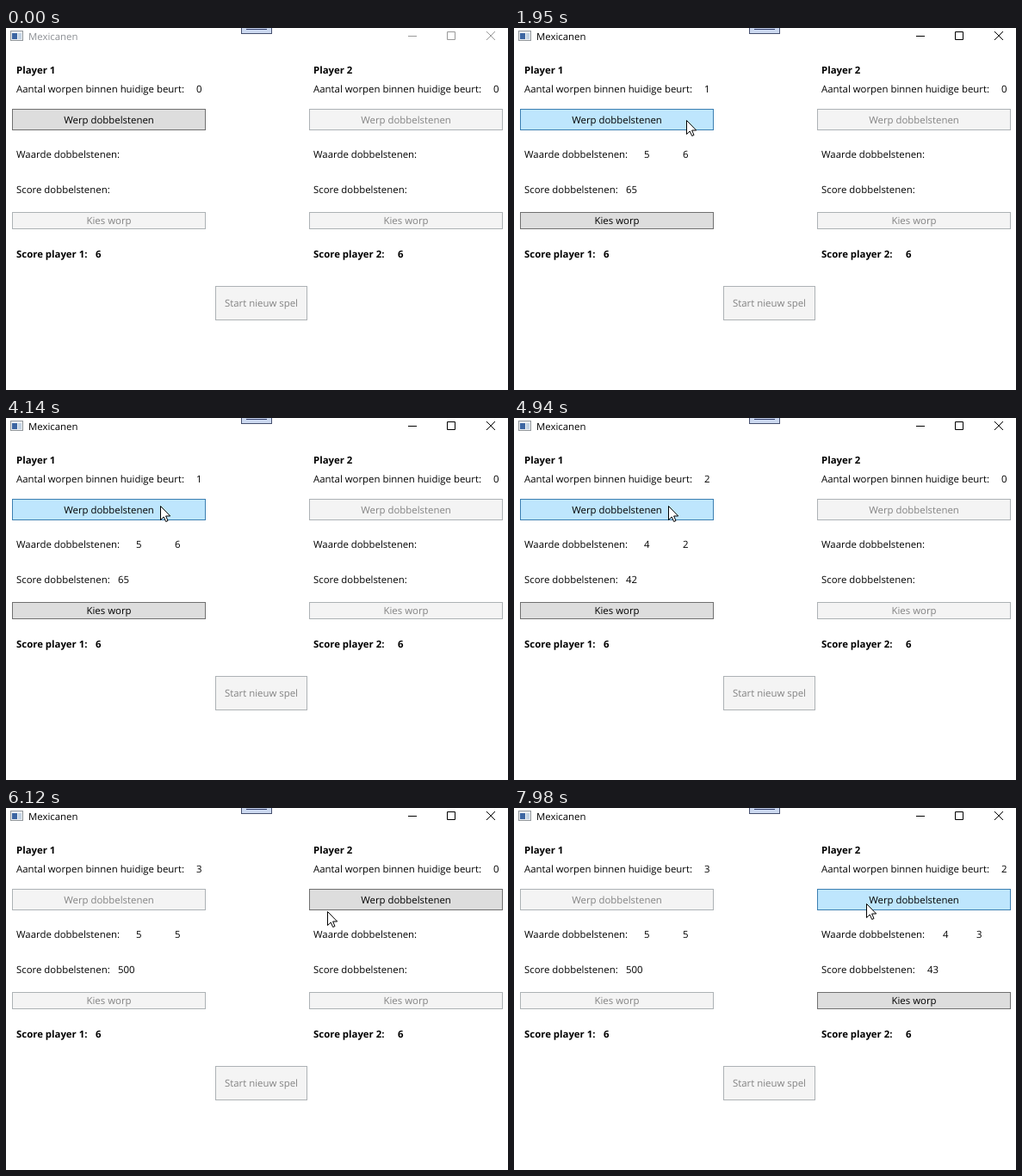
Write an HTML page that moves like this. It is 583x421 px and loops after 8000 ms.

```html
<!DOCTYPE html>
<html lang="nl">
<head>
<meta charset="utf-8">
<title>Mexicanen</title>
<style>
html, body { margin: 0; width: 100%; height: 100%; overflow: hidden; background: #fff; }
svg { display: block; width: 583px; height: 421px; }
text { font: 11.4px "Open Sans", "Noto Sans", sans-serif; white-space: pre; text-rendering: geometricPrecision; }
.bold { font-weight: 700; }
.mid { text-anchor: middle; }
</style>
</head>
<body>
<svg id="stage" viewBox="0 0 583 421"></svg>
<script>
const LOOP = 8000, TICK = 66;
const stage = document.getElementById('stage');

function add(tag, attrs, content = '') {
  const el = document.createElementNS('http://www.w3.org/2000/svg', tag);
  for (const k in attrs) el.setAttribute(k, attrs[k]);
  el.textContent = content;
  stage.append(el);
  return el;
}
const label = (x, y, s = '', cls = '') => add('text', { x, y, class: cls }, s);

const LOOKS = { // fill, border, text
  normal: ['#dddddd', '#707070', '#000'],
  hover: ['#bee6fd', '#3c7fb1', '#000'],
  pressed: ['#c4e5f6', '#2c628b', '#000'],
  disabled: ['#f4f4f4', '#adb2b5', '#838383']
};

function button(x, y, w, h, caption) {
  const box = add('rect', { x: x + .5, y: y + .5, width: w - 1, height: h - 1 });
  const text = label(x + w / 2, Math.ceil(y + h / 2) + 4, caption, 'mid');
  return {
    holds: p => p.x >= x && p.x < x + w && p.y >= y && p.y < y + h,
    show(look) {
      const [fill, stroke, ink] = LOOKS[look];
      box.setAttribute('fill', fill);
      box.setAttribute('stroke', stroke);
      text.setAttribute('fill', ink);
    }
  };
}

// Title bar
add('rect', { x: 5.5, y: 3.5, width: 14, height: 11, fill: '#eceff2', stroke: '#92979c' });
add('rect', { x: 7, y: 6, width: 6, height: 7, fill: '#3d66a3' });
add('rect', { x: 14, y: 6, width: 4, height: 7, fill: '#c3d3e4' });
const title = label(26, 14, 'Mexicanen');
const controls = add('path', {
  d: 'M467 9.5h10M512.5 4.5h9v9h-9zM558 4l10 10M568 4l-10 10', fill: 'none'
});
add('rect', { x: 273.5, y: -5.5, width: 35, height: 12, fill: '#ccd9f0', stroke: '#46506f' });
add('path', { d: 'M279 1.5h24', stroke: '#34406e' });

function player(n, x, die1, die2, score, total) {
  label(x + 5, 53, 'Player ' + n, 'bold');
  label(x + 5, 75, 'Aantal worpen binnen huidige beurt:');
  label(x + 5, 151, 'Waarde dobbelstenen:');
  label(x + 5, 192, 'Score dobbelstenen:');
  label(x + 5, 267, `Score player ${n}:`, 'bold');
  label(x + total, 267, '6', 'bold');
  return {
    roll: button(x, 94, 225, 25, 'Werp dobbelstenen'),
    pick: button(x, 214, 225, 20, 'Kies worp'),
    fields: [label(x + 214, 75), label(x + die1, 151), label(x + die2, 151), label(x + score, 192)]
  };
}
const players = [player(1, 7, 144, 189, 123, 97), player(2, 352, 146, 185, 128, 103)];
button(243, 300, 107, 40, 'Start nieuw spel').show('disabled');

// Press times and dice; a turn is three throws
const TURN = 3, RELEASE = 140, RESULT = 200;
const throws = [[1750, '56'], [4210, '42'], [5070, '55'], [6720, '61'], [7780, '43']];

// A pair counts in hundreds, otherwise the highest die comes first
const scoreOf = ([a, b]) => a === b ? a * 100 : Math.max(a + b, b + a);

// Pointer moves: curved path with one control point, easing out by a power
const moves = [
  { start: 500, span: 730, power: 2, path: [[486, 407], [260, 37], [200, 107]] },
  { start: 3220, span: 790, power: 1, path: [[200, 107], [155, 242], [179, 102]] },
  { start: 5660, span: 730, power: 2.4, path: [[179, 102], [201, 165], [409, 111]] }
];

function pointerAt(t) {
  const move = moves.filter(m => m.start <= t).pop();
  if (!move) return null;
  const elapsed = Math.floor((t - move.start + 8) / TICK) * TICK;
  const v = (1 - Math.min(1, elapsed / move.span)) ** move.power, u = 1 - v;
  const [x, y] = [0, 1].map(k => {
    const [a, c, b] = move.path.map(p => p[k]);
    return Math.round(v * v * a + 2 * u * v * c + u * u * b);
  });
  return { x, y };
}

const arrow = add('path', {
  d: 'M.5 .5V16.6L4.2 13L6.7 18.5L9 17.5L6.6 12H11.7Z', fill: '#fff', stroke: '#000'
});

function render(t) {
  const pos = pointerAt(t);
  arrow.setAttribute('visibility', pos ? 'visible' : 'hidden');
  if (pos) arrow.setAttribute('transform', `translate(${pos.x} ${pos.y})`);

  const active = t >= throws[0][0];
  title.setAttribute('fill', active ? '#000' : '#8c8f94');
  controls.setAttribute('stroke', active ? '#000' : '#999');

  const done = throws.filter(([at]) => t >= at + RESULT).map(([, dice]) => dice);
  const held = throws.some(([at]) => t >= at && t < at + RELEASE);
  const turn = Math.floor(done.length / TURN);

  players.forEach((p, n) => {
    const own = done.slice(n * TURN, (n + 1) * TURN);
    const dice = own[own.length - 1];
    const values = dice ? [own.length, ...dice, scoreOf(dice)] : [0, '', '', ''];
    p.fields.forEach((f, i) => { f.textContent = values[i]; });
    const over = pos && p.roll.holds(pos);
    p.roll.show(n !== turn ? 'disabled' : !over ? 'normal' : held ? 'pressed' : 'hover');
    p.pick.show(n === turn && dice ? 'normal' : 'disabled');
  });
}

const begin = performance.now();
function loop() {
  render((performance.now() - begin) % LOOP);
  requestAnimationFrame(loop);
}
loop();
</script>
</body>
</html>
```
